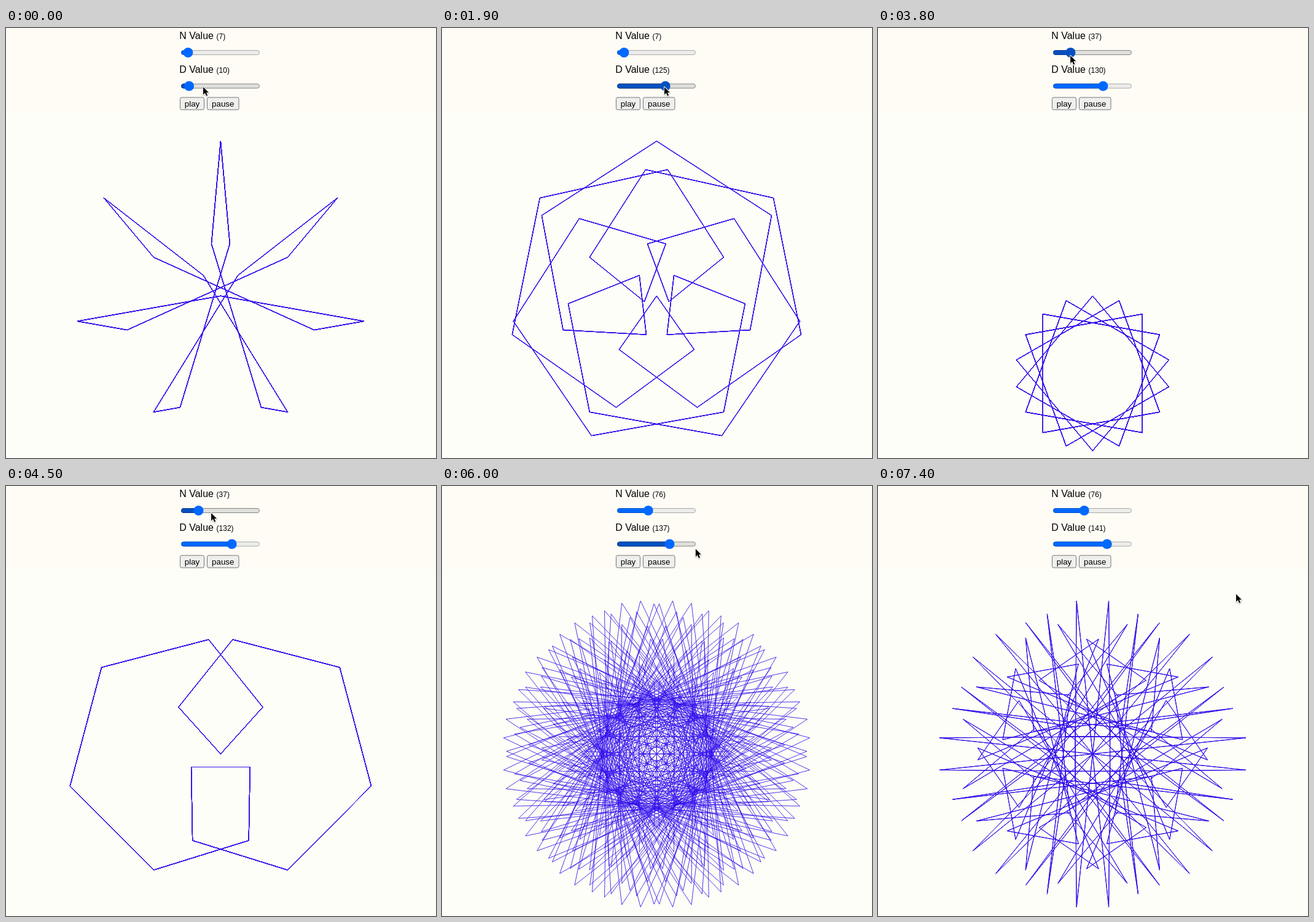
These frames come from a looping animation (700x700 px, 7.5 s). An HTML page with a canvas:

```html
<!DOCTYPE html>
<html lang="en">
<head>
<meta charset="utf-8">
<title>Maurer rose</title>
<style>
  html, body { margin: 0; width: 100%; height: 100%; overflow: hidden; background: #fdfef7; }
  canvas { display: block; }
</style>
</head>
<body>
<canvas id="stage" width="700" height="700"></canvas>
<script>
const ctx = document.getElementById('stage').getContext('2d');
const FONT = '"Liberation Sans", Arial, sans-serif';
const LOOP = 7500, STEP = 100, TICK = 333;
const CX = 349.4, CY = 436.2, R = 252;
const INK = '#3512ee';

// Pointer stops: time, x, y
const PATH = [
  [0, 321, 96], [1200, 362, 96], [2000, 362, 96], [3000, 312, 46],
  [3700, 312, 45], [4400, 334, 44], [5100, 335, 44], [5300, 338, 44],
  [5500, 339, 46], [6600, 510, 177], [7100, 583, 176], [LOOP, 583, 176]
];

const nValue = t => t < 3600 ? 7 : t < 5050 ? 37 : 76;
const dValue = t => Math.floor(t < 1300
  ? 10 + (t + 113) / TICK
  : 128.95 + (t - 3200) / TICK);

function pointer(t) {
  const i = PATH.findIndex(p => p[0] > t);
  const a = PATH[i - 1], b = PATH[i];
  const u = (t - a[0]) / (b[0] - a[0]);
  const e = u * u * (3 - 2 * u);
  return { x: a[1] + (b[1] - a[1]) * e, y: a[2] + (b[2] - a[2]) * e };
}

function text(s, x, y, size, align = 'left') {
  ctx.font = size + 'px ' + FONT;
  ctx.textAlign = align;
  ctx.fillStyle = '#000';
  ctx.fillText(s, x, y);
}

function box(x, y, w, h, r, fill, line) {
  ctx.beginPath();
  ctx.roundRect(x, y, w, h, r);
  ctx.fillStyle = fill;
  ctx.fill();
  ctx.strokeStyle = line;
  ctx.lineWidth = 1;
  ctx.stroke();
}

function slider(y, value, mouse) {
  const knob = 292.4 + 0.57 * value;
  const over = mouse.x > 284 && mouse.x < 415 && Math.abs(mouse.y - y) < 8.5;
  const onKnob = over && Math.hypot(mouse.x - knob, mouse.y - y) < 8;
  box(285.5, y - 3.5, 127, 7, 3.5, over ? '#dfdfdc' : '#ececea', over ? '#858585' : '#a9a9a9');
  box(285.5, y - 3.5, knob - 285.5, 7, 3.5, over ? '#0650c2' : '#0168ff', over ? '#0a3a8c' : '#0a55cc');
  ctx.beginPath();
  ctx.arc(knob, y, 8, 0, Math.PI * 2);
  ctx.fillStyle = onKnob ? '#0450c2' : '#0168ff';
  ctx.fill();
}

function button(x, w, label) {
  box(x, 113, w, 20, 2.5, '#efefed', '#747474');
  text(label, x + w / 2, 127.5, 13.333, 'center');
}

function control(name, value, y, mouse) {
  text(name + ' Value', 282.2, y, 16);
  text('(' + value + ')', 342.6, y, 12);
  slider(y + 22, value, mouse);
}

function rose(n, d) {
  const pts = [];
  let reach = 0;
  for (let i = 0; i <= 360; i++) {
    const k = i * d * Math.PI / 180;
    const r = R * Math.sin(n * k);
    reach = Math.max(reach, Math.abs(r));
    pts.push([CX + r * Math.cos(k), CY + r * Math.sin(k)]);
  }
  ctx.strokeStyle = INK;
  ctx.lineWidth = 0.85;
  ctx.beginPath();
  if (reach < 0.01) {
    // every point meets in the centre: only the tiny mitred joins show
    ctx.lineWidth = 0.6;
    for (let i = 0; i < 8; i++) {
      const a = i * Math.PI / 4;
      ctx.moveTo(CX, CY);
      ctx.lineTo(CX + 3.2 * Math.cos(a), CY + 3.2 * Math.sin(a));
    }
  } else {
    pts.forEach(p => ctx.lineTo(p[0], p[1]));
  }
  ctx.stroke();
}

function arrow({ x, y }) {
  const shape = [[0, 0], [0, 12.5], [2.9, 9.8], [5.1, 14.6], [7.2, 13.7], [5.1, 9], [9, 9]];
  ctx.save();
  ctx.translate(x, y);
  ctx.beginPath();
  shape.forEach(p => ctx.lineTo(p[0], p[1]));
  ctx.closePath();
  ctx.lineJoin = 'round';
  ctx.lineWidth = 1.8;
  ctx.strokeStyle = '#fff';
  ctx.shadowColor = 'rgba(0,0,0,.3)';
  ctx.shadowBlur = 2;
  ctx.shadowOffsetY = 1;
  ctx.stroke();
  ctx.shadowColor = 'transparent';
  ctx.fillStyle = '#000';
  ctx.fill();
  ctx.restore();
}

function draw(t) {
  const n = nValue(t), d = dValue(t), mouse = pointer(t);
  ctx.fillStyle = '#fdfef7';
  ctx.fillRect(0, 0, 700, 700);
  ctx.fillStyle = '#fefcf5';
  ctx.fillRect(0, 0, 700, 136);
  control('N', n, 18, mouse);
  control('D', d, 72.5, mouse);
  button(283.5, 39, 'play');
  button(327.5, 51.5, 'pause');
  rose(n, d);
  arrow(mouse);
}

const start = performance.now();
function frame() {
  const t = (performance.now() - start) % LOOP;
  draw(Math.floor(t / STEP) * STEP);
  requestAnimationFrame(frame);
}
frame();
</script>
</body>
</html>
```
